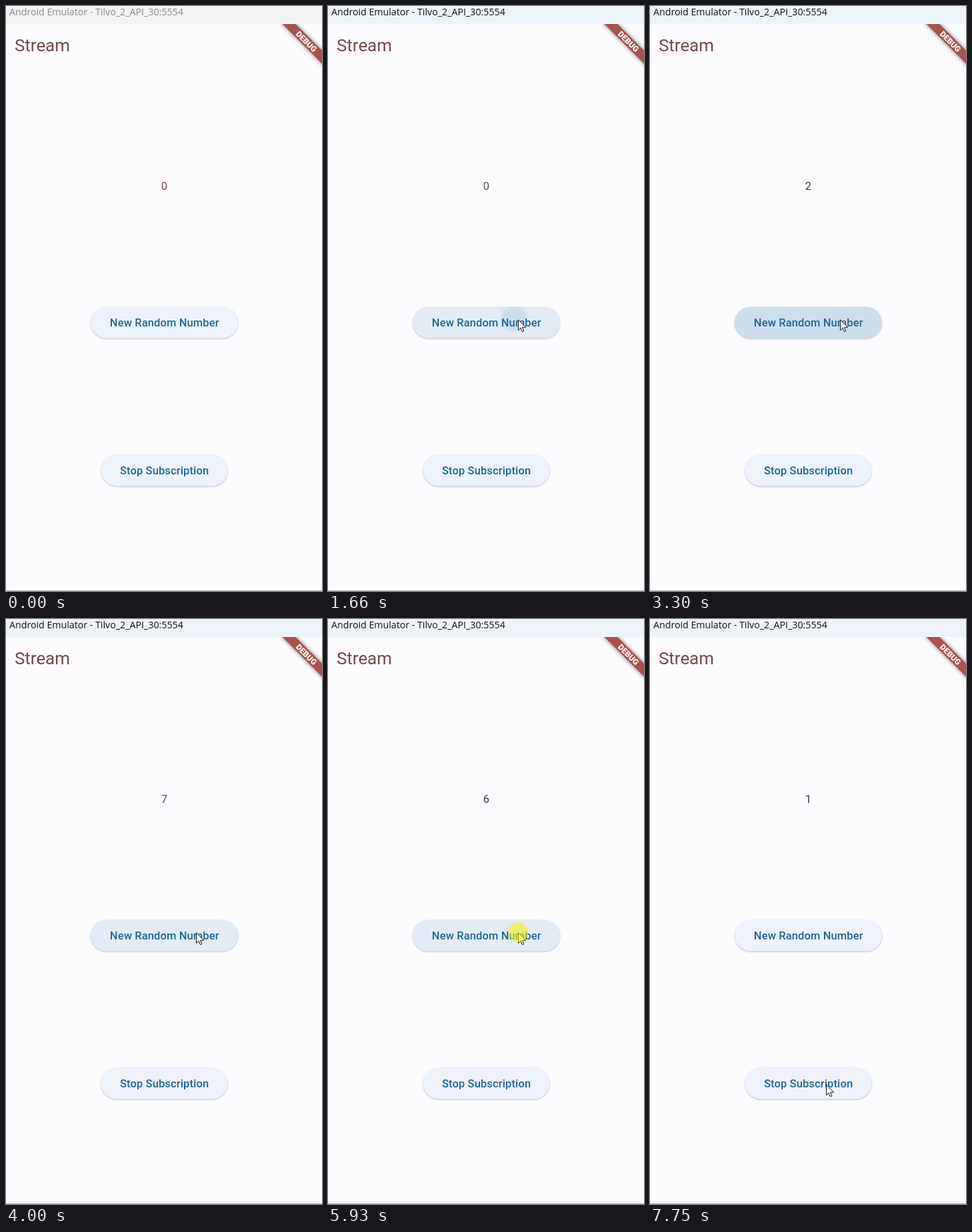
Animation, 474 px wide and 878 px high, one loop 8000 ms. Source, as an HTML page:

```html
<!DOCTYPE html>
<html lang="en">
<head>
<meta charset="utf-8">
<title>Stream</title>
<style>
  html, body { margin: 0; width: 100%; height: 100%; overflow: hidden; background: #fcfcff; }
  svg { display: block; }
  text { font-family: Roboto, sans-serif; }

  .bar { fill: #f3f3f3; animation: bar 8s step-end infinite; }
  .caption { font: 14.2px "Open Sans", "Noto Sans", sans-serif; fill: #8a8a8a; animation: caption 8s step-end infinite; }
  .heading { font-size: 25.9px; fill: #70494d; }
  .label { font-size: 16.5px; font-weight: 500; letter-spacing: .118px; fill: #1c6798; text-anchor: middle; }
  .pill { fill: #eef2fa; filter: drop-shadow(0 1px 1px rgba(0, 0, 0, .26)); }
  .ribbon { fill: #a9524f; filter: drop-shadow(0 0 3px rgba(0, 0, 0, .5)); }
  .debug { font-size: 12px; font-weight: 900; fill: #fff; text-anchor: middle; }
  .digits { font-size: 16.5px; fill: #1d3f63; text-anchor: middle; animation: digits 8s step-end infinite; }

  .hover { fill: #006590; opacity: 0; animation: hover 8s linear infinite; }
  .ripple { opacity: 0; animation: ripple 8s linear var(--at) infinite; }
  .ripple.held { animation-name: ripple-held; }
  .dot { fill: #fbf200; opacity: 0; animation: dot 8s step-end var(--at) infinite; }
  .dot.held { animation-name: dot-held; }
  .cursor { animation: move 8s linear infinite, show 8s step-end infinite; }

  @keyframes bar { 17.125%, 100% { fill: #edf4f9; } }
  @keyframes caption { 17.125%, 100% { fill: #111; } }
  @keyframes hover {
    0%, 17.2% { opacity: 0; }
    18%, 87.3% { opacity: .048; }
    88.7%, 100% { opacity: 0; }
  }
  @keyframes ripple {
    0%, .3% { opacity: 0; transform: scale(.06); }
    .9% { opacity: .55; transform: scale(.1); }
    2.5% { opacity: .8; transform: scale(.6); }
    3.1% { opacity: 1; transform: scale(.82); }
    4.6% { transform: scale(1); }
    7%, 100% { opacity: 0; transform: scale(1); }
  }
  @keyframes ripple-held {
    0%, .3% { opacity: 0; transform: scale(.06); }
    .9% { opacity: .55; transform: scale(.1); }
    3.1% { opacity: 1; transform: scale(.82); }
    4.4% { transform: scale(1); }
    5.4% { opacity: 1; }
    9%, 100% { opacity: 0; transform: scale(1); }
  }
  @keyframes dot { 0% { opacity: .55; } 1.25%, 100% { opacity: 0; } }
  @keyframes dot-held { 0% { opacity: .55; } 5.4%, 100% { opacity: 0; } }
  @keyframes digits {
    0% { transform: translateY(0); }
    21.25% { transform: translateY(-30px); }
    27.5% { transform: translateY(-60px); }
    37.7% { transform: translateY(-90px); }
    44% { transform: translateY(-120px); }
    53.75% { transform: translateY(-150px); }
    61.9% { transform: translateY(-180px); }
    66.9% { transform: translateY(-210px); }
    74.9% { transform: translateY(-240px); }
    81.5%, 100% { transform: translateY(-270px); }
  }
  @keyframes show { 0% { opacity: 0; } 3.125%, 100% { opacity: 1; } }
  @keyframes move {
    0%, 3.125% { transform: translate(406px, 820px); }
    6.25% { transform: translate(372px, 560px); }
    8.75% { transform: translate(335px, 400px); }
    9.75% { transform: translate(318px, 376px); }
    11.9% { transform: translate(292px, 455px); }
    12.875%, 86.9% { transform: translate(285px, 470px); }
    87.75% { transform: translate(254px, 536px); }
    88.875% { transform: translate(246px, 621px); }
    89.75% { transform: translate(244px, 640px); }
    90.7% { transform: translate(246px, 662px); }
    93.75% { transform: translate(258px, 690px); }
    96.8%, 100% { transform: translate(264px, 698px); }
  }
</style>
</head>
<body>
<svg width="474" height="878" viewBox="0 0 474 878">
  <defs>
    <radialGradient id="splash">
      <stop offset=".7" stop-color="#006590" stop-opacity=".19"/>
      <stop offset="1" stop-color="#006590" stop-opacity="0"/>
    </radialGradient>
    <clipPath id="pillClip"><rect x="127" y="451.5" width="221" height="47" rx="23.5"/></clipPath>
    <clipPath id="digitClip"><rect x="222" y="258" width="30" height="24"/></clipPath>
    <clipPath id="screenClip"><rect y="27" width="474" height="851"/></clipPath>
  </defs>

  <rect width="474" height="878" fill="#fcfcff"/>
  <rect class="bar" width="474" height="27"/>
  <text class="caption" x="5" y="14">Android Emulator - Tilvo_2_API_30:5554</text>
  <text class="heading" x="13" y="68.3">Stream</text>

  <g clip-path="url(#screenClip)">
    <g transform="translate(479 25) rotate(45)">
      <rect class="ribbon" x="-47" y="33" width="94" height="14"/>
      <text class="debug" y="44.3">DEBUG</text>
    </g>
  </g>

  <g clip-path="url(#digitClip)">
    <g class="digits">
      <text x="237.5" y="276" fill="#70494d">0</text>
      <text x="237.5" y="306">3</text>
      <text x="237.5" y="336">5</text>
      <text x="237.5" y="366">2</text>
      <text x="237.5" y="396" fill="#2a5b8c">7</text>
      <text x="237.5" y="426" fill="#1b2d3f">4</text>
      <text x="237.5" y="456">9</text>
      <text x="237.5" y="486" fill="#1f4057">6</text>
      <text x="237.5" y="516">3</text>
      <text x="237.5" y="546">1</text>
    </g>
  </g>

  <rect class="pill" x="127" y="451.5" width="221" height="47" rx="23.5"/>
  <g clip-path="url(#pillClip)">
    <rect class="hover" x="127" y="451" width="221" height="48"/>
    <g transform="translate(279 469)" fill="url(#splash)">
      <circle class="ripple" r="230" style="--at:1.59s"/>
      <circle class="ripple" r="230" style="--at:2.1s"/>
      <circle class="ripple" r="230" style="--at:2.9s"/>
      <circle class="ripple" r="230" style="--at:3.42s"/>
      <circle class="ripple" r="230" style="--at:4.2s"/>
      <circle class="ripple held" r="230" style="--at:4.52s"/>
      <circle class="ripple" r="230" style="--at:5.25s"/>
      <circle class="ripple" r="230" style="--at:5.89s"/>
      <circle class="ripple" r="230" style="--at:6.42s"/>
    </g>
  </g>
  <text class="label" x="237.7" y="481.2">New Random Number</text>

  <rect class="pill" x="142.5" y="673.5" width="190" height="47" rx="23.5"/>
  <text class="label" x="237.6" y="703.2">Stop Subscription</text>

  <rect y="877" width="474" height="1" fill="#b9b9bb"/>

  <path class="cursor" d="M.5 .8V16.6L4.1 13.2L6.5 18.8L8.9 17.8L6.5 12.3H11.6Z" fill="#fff" stroke="#111"/>
  <g transform="translate(285 470)">
    <circle class="dot" r="15" style="--at:2.1s"/>
    <circle class="dot" r="15" style="--at:2.9s"/>
    <circle class="dot" r="15" style="--at:3.42s"/>
    <circle class="dot" r="15" style="--at:4.2s"/>
    <circle class="dot held" r="15" style="--at:4.52s"/>
    <circle class="dot" r="15" style="--at:5.25s"/>
    <circle class="dot" r="15" style="--at:5.89s"/>
    <circle class="dot" r="15" style="--at:6.42s"/>
  </g>
</svg>
</body>
</html>
```
